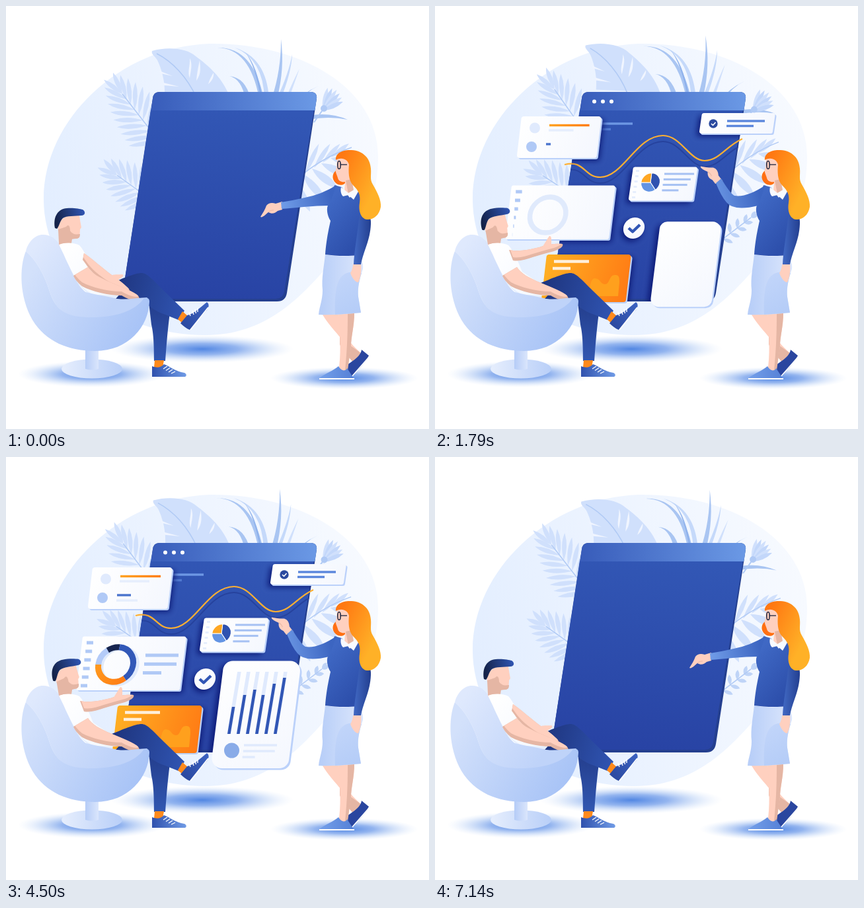
Animation, 640 px wide and 640 px high, one loop 7210 ms. Source, as an HTML page with a canvas:

```html
<!DOCTYPE html>
<html lang="en">
<head>
<meta charset="utf-8">
<title>Dashboard presentation</title>
<style>
html, body { margin: 0; width: 100%; height: 100%; overflow: hidden; background: #fff; }
canvas { display: block; width: 100vw; height: 100vh; }
</style>
</head>
<body>
<canvas id="stage" width="640" height="640"></canvas>
<script>
const ctx = document.getElementById('stage').getContext('2d');
const LOOP = 7210, TAU = Math.PI * 2;
const SKIN = '#ffd0bf', SKIN_DARK = '#e5b6a4', LEAF = '#d0e0fc', VEIN = '#b0caf5';
const PALE = '#e6eefd', SOFT = '#b0c9f6', BLUE = '#3156b5';

// --- timing ---
const ease = u => u < .5 ? 2 * u * u : 1 - 2 * (1 - u) * (1 - u);
const ramp = (t, a, b) => ease(Math.min(1, Math.max(0, (t - a) / (b - a))));
const span = (t, a, b, c, d) => ramp(t, a, b) * (1 - ramp(t, c, d));

// --- drawing helpers ---
const cache = new Map();
function path(d) {
  if (typeof d !== 'string') return d;
  if (!cache.has(d)) cache.set(d, new Path2D(d));
  return cache.get(d);
}
function lin(x0, y0, x1, y1, ...colors) {
  const g = ctx.createLinearGradient(x0, y0, x1, y1);
  colors.forEach((c, i) => g.addColorStop(i / (colors.length - 1), c));
  return g;
}
function fill(d, color) { ctx.fillStyle = color; ctx.fill(path(d)); }
function line(d, color, width, cap = 'butt') {
  ctx.strokeStyle = color;
  ctx.lineWidth = width;
  ctx.lineCap = cap;
  ctx.lineJoin = 'round';
  ctx.stroke(path(d));
}
function disc(x, y, r, color, ry = r) {
  if (r <= 0) return;
  ctx.fillStyle = color;
  ctx.beginPath();
  ctx.ellipse(x, y, r, ry, 0, 0, TAU);
  ctx.fill();
}
function bar(x, y, w, color, p = 1, h = 3.4) {
  ctx.fillStyle = color;
  ctx.fillRect(x, y - h / 2, w * p, h);
}
function group(draw) { ctx.save(); draw(); ctx.restore(); }
function turn(x, y, a, draw) {
  group(() => { ctx.translate(x, y); ctx.rotate(a); ctx.translate(-x, -y); draw(); });
}
// lean to the right around height y, like the cards
function lean(y, draw) {
  group(() => { ctx.transform(1, 0, -.13, 1, .13 * y, 0); draw(); });
}
function morph(a, b, p) {
  const to = b.match(/-?[\d.]+/g);
  let i = 0;
  return new Path2D(a.replace(/-?[\d.]+/g, n => +n + (to[i++] - n) * p));
}
// skin with a darker lower side
function limb(shape, dy = -5) {
  group(() => {
    fill(shape, SKIN_DARK);
    ctx.clip(path(shape));
    ctx.translate(0, dy);
    fill(shape, SKIN);
  });
}
function glow(x, y, rx, ry) {
  group(() => {
    ctx.translate(x, y);
    ctx.scale(rx, ry);
    const g = ctx.createRadialGradient(0, 0, 0, 0, 0, 1);
    g.addColorStop(0, 'rgba(78,132,226,.98)');
    g.addColorStop(.4, 'rgba(106,152,233,.72)');
    g.addColorStop(.75, 'rgba(150,185,241,.28)');
    g.addColorStop(1, 'rgba(200,220,250,0)');
    disc(0, 0, 1, g);
  });
}

// --- plants ---
function lens(x, y, a, len, w, color) {
  group(() => {
    ctx.translate(x, y);
    ctx.rotate(a);
    ctx.beginPath();
    ctx.moveTo(0, 0);
    ctx.quadraticCurveTo(len * .6, -w, len, 0);
    ctx.quadraticCurveTo(len * .5, w, 0, 0);
    ctx.fillStyle = color;
    ctx.fill();
  });
}
function frond(x0, y0, x1, y1, n, len, w, color = LEAF) {
  const axis = Math.atan2(y1 - y0, x1 - x0);
  for (let i = 0; i <= n; i++) {
    const s = i / n, x = x0 + (x1 - x0) * s, y = y0 + (y1 - y0) * s;
    for (const side of [-1, 1])
      lens(x, y, axis + side * (1.05 - .8 * s * s), len * (1 - .25 * s * s), w, color);
  }
  line(`M${x0} ${y0}L${x1} ${y1}`, VEIN, 1.5);
}
function blade(x0, y0, cx, cy, x1, y1, w, color) {
  fill(`M${x0} ${y0}Q${cx} ${cy} ${x1} ${y1}h${-w}Q${cx - w * .7} ${cy + w * .3} ${x0} ${y0}Z`, color);
}
function plants(t) {
  const sway = (1 - Math.cos(TAU * 5 * t / LOOP)) / 2;
  turn(325, 228, .1 * sway, () => frond(232, 205, 176, 133, 9, 47, 7));
  turn(180, 360, -.1 * sway, () => frond(218, 292, 168, 256, 7, 42, 7));
  turn(401, 208, .1 * sway, () => {
    fill('M221 68C245 61 274 64 287 76C302 87 326 106 337 134H240C241 112 234 92 229 82C226 76 219 73 221 68Z', LEAF);
    fill('M278 79C283 88 279 100 278 109C274 100 279 90 278 79ZM293 82C294 92 296 102 288 113C289 101 291 92 293 82ZM314 101C315 108 311 114 306 118C308 111 311 106 314 101ZM232 98L252 106L234 102ZM238 116L262 122L239 120Z', '#f0f5ff');
    line('M228 72C252 84 274 108 288 138', VEIN, 1.5);
  });
  turn(252, 242, -.073 * sway, () => {
    blade(320, 63, 374, 62, 390, 140, 7, '#a9c5f2');
    blade(346, 63, 394, 78, 398, 140, 7, '#c5d9fa');
    blade(362, 70, 380, 90, 388, 140, 3, '#8fb2ec');
    blade(338, 106, 362, 108, 370, 140, 8, '#a9c5f2');
    blade(416, 50, 422, 95, 410, 140, 8, '#a9c5f2');
    blade(433, 73, 432, 100, 416, 140, 6, '#c5d9fa');
    blade(444, 95, 438, 112, 428, 140, 5, '#d0e0fc');
    blade(473, 121, 452, 130, 440, 150, 6, '#a9c5f2');
    fill('M458 166Q490 160 517 172Q488 166 458 172Z', '#a9c5f2');
  });
  turn(468, 172, .24 * sway, () => {
    for (let i = 0; i < 6; i++) lens(479, 158, -1.35 + i * .19, 38 - Math.abs(i - 2) * 1.5, 7, i % 2 ? '#c3d7fa' : LEAF);
    line('M466 176L480 156', VEIN, 2);
    disc(481, 155, 5, VEIN);
  });
  turn(350, 275, -.1 * sway, () => {
    for (let i = 0; i < 5; i++) lens(440 + i * 13, 261 - i * 8, -1.3 + i * .16, 54 - i * 5, 7, LEAF);
    for (let i = 0; i < 5; i++) lens(435 + i * 14, 262 - i * 8, 1.1 - i * .22, 55 - i * 3, 12, LEAF);
    line('M440 262C465 240 490 225 523 214', VEIN, 1.5);
  });
  const grow = ramp(t, 900, 1400);
  if (grow > 0) group(() => {
    ctx.translate(440, 350 - 2 * sway);
    ctx.scale(grow, grow);
    frond(-4, 3, 38, -29, 4, 16, 6, '#bfd4f7');
  });
}

// --- screen and cards ---
const SCREEN = 'M232 130H461Q471 130 470 140L425 434Q423 447 410 447H188Q175 447 176 438L222 140Q223 130 232 130Z';

function board(t) {
  fill(SCREEN, '#243f8f');
  fill('M219 157H466L421 432Q419 443 408 443H176V438Z', lin(330, 150, 290, 440, '#3257b5', '#2843a4'));
  fill('M219.3 158L222 140Q223 130 232 130H461Q471 130 470 140L467.3 158Z', lin(220, 0, 470, 0, '#385cba', '#6b99e5'));
  const p = span(t, 200, 550, 6800, 7080);
  for (let i = 0; i < 3; i++) disc(241 + 13 * i, 144.5, 3 * p, '#fff');
  bar(228, 178, 71, '#6d97e4', p);
  bar(227, 186.5, 39, '#5079d0', p);
}

function slab(l, r, top, bottom, slant, rad) {
  const s = new Path2D();
  s.moveTo((l + r) / 2, top);
  s.arcTo(r, top, r - slant, bottom, rad);
  s.arcTo(r - slant, bottom, l - slant, bottom, rad);
  s.arcTo(l - slant, bottom, l, top, rad);
  s.arcTo(l, top, r, top, rad);
  s.closePath();
  return s;
}
function arc(x, y, r, a = 0, b = 360) {
  const s = new Path2D();
  s.arc(x, y, r, a * TAU / 360, b * TAU / 360);
  return s;
}
function leaningDisc(x, y, r) {
  const s = new Path2D();
  s.ellipse(x, y, r * 1.06, r * .95, -TAU / 8, 0, TAU);
  return s;
}
// shade: horizontal direction of the shadow, rim: thickness of the lower right edge
function card(k, draw) {
  const { shape, cx, cy, scale = 1, alpha = 1, dx = 0, paint, rim = 2, shade = 4 } = k;
  if (alpha <= .01 || scale <= .01) return;
  const place = shift => {
    ctx.globalAlpha = alpha;
    ctx.translate(cx + dx + shift, cy);
    ctx.scale(scale, scale);
    ctx.translate(-cx, -cy);
  };
  group(() => {
    ctx.clip(path(SCREEN));
    place(-2000);
    ctx.shadowColor = 'rgba(10,22,115,.95)';
    ctx.shadowBlur = 9;
    ctx.shadowOffsetX = 2000 + shade;
    ctx.shadowOffsetY = 4;
    fill(shape, '#000');
  });
  group(() => {
    place(0);
    if (rim) group(() => { ctx.translate(rim, rim); fill(shape, '#bbd1fa'); });
    fill(shape, paint);
    draw();
  });
}
const slabs = {
  list: slab(131, 252, 167, 230, 7.5, 4),
  note: slab(404, 515, 162, 193, 4.5, 3),
  pie: slab(300, 397.5, 243.5, 294.5, 7.5, 3),
  ring: slab(116, 273, 271.5, 353, 10, 3),
  sun: slab(169, 297, 376, 448, 8.5, 4),
  chart: slab(330, 447, 308.5, 471, 20.5, 15),
  tick: leaningDisc(301, 336, 16)
};
const paper = (x0, y0, x1, y1) => lin(x0, y0, x1, y1, '#ffffff', '#f4f7fe');

function wedge(x, y, r, a, b, color) {
  const s = new Path2D();
  s.moveTo(x, y);
  s.arc(x, y, r, a * TAU / 360, b * TAU / 360);
  s.closePath();
  fill(s, color);
  line(s, '#fff', 1);
}

function wave(t) {
  const curve = 'M196 240C226 232 225 259 250 259C285 259 305 196 345 196C372 196 385 234 408 234C430 234 440 212 465 201';
  group(() => {
    ctx.clip(path(SCREEN));
    ctx.globalAlpha = span(t, 300, 650, 6800, 7080);
    ctx.translate(0, 9);
    line(curve, '#26429d', 2);
  });
  const p = span(t, 400, 1400, 6256, 6956);
  if (p > 0) group(() => {
    ctx.beginPath();
    ctx.rect(195, 180, 271 * p, 100);
    ctx.clip();
    line(curve, '#ffb032', 2.2);
  });
}

function listCard(t) {
  const p = span(t, 450, 1000, 6170, 6640);
  card({ shape: slabs.list, cx: 190, cy: 199, alpha: p, dx: 23 * (1 - p), paint: paper(131, 167, 250, 230) }, () => {
    disc(151, 184.5, 8 * span(t, 1150, 1500, 5950, 6300), '#e0eafd');
    disc(146, 213, 8 * span(t, 1250, 1600, 6050, 6380), SOFT);
    bar(173, 180.5, 61, lin(173, 0, 234, 0, '#ffa322', '#ff7c13'), span(t, 1300, 1820, 5800, 6300));
    bar(172, 188, 45, PALE, span(t, 1400, 1950, 5850, 6350));
    bar(168, 209, 21, '#4a74cd', span(t, 1570, 2110, 5950, 6500));
    bar(167, 217, 32, PALE, span(t, 1780, 2350, 6200, 6700));
  });
}
function noteCard(t) {
  const p = span(t, 430, 990, 6550, 6950);
  card({ shape: slabs.note, cx: 458, cy: 178, alpha: p, dx: -40 * (1 - p), shade: -4, paint: paper(404, 162, 512, 193) }, () => {
    const q = span(t, 950, 1350, 6330, 6800);
    disc(421, 178, 6.7 * q, '#2b4a9f');
    if (q > .8) line('M418 178L420.5 180.5L424.5 176', '#fff', 1.6);
    bar(442, 174, 57, '#5b86dc', q);
    bar(441, 181.5, 41, '#5b86dc', q);
  });
}
function pieCard(t) {
  card({ shape: slabs.pie, cx: 345, cy: 269, scale: span(t, 850, 1350, 6560, 6960), shade: -4, paint: paper(300, 243, 395, 295) }, () => {
    for (let i = 0; i < 6; i++) bar(304 - i * 1.2, 249.5 + i * 8, 5, PALE, 1, 3);
    lean(267, () => {
      wedge(326, 267, 14.3, -90, 52, '#2f52b0');
      wedge(326, 267, 14.3, 52, 180, '#6394e4');
      wedge(326, 267, 14.3, 180, 270, '#ffa723');
    });
    [45, 41, 37, 25].forEach((w, i) =>
      bar(347 - i * 1.2, 254 + i * 8.3, w, '#a6c1f3', span(t, 1150, 1650, 6280 + i * 110, 6880 + i * 110), 3));
  });
}
function ringCard(t) {
  const p = span(t, 850, 1400, 6650, 7000);
  card({ shape: slabs.ring, cx: 190, cy: 312, alpha: p, dx: 25 * (1 - p), paint: paper(116, 271, 268, 353) }, () => {
    for (let i = 0; i < 6; i++) {
      const q = span(t, 1250 + i * 90, 1900 + i * 110, 6050 + i * 70, 6520 + i * 100);
      bar(122 - i * 1.8 + 4 * (1 - q), 281 + i * 13, 10, SOFT, q, 5);
    }
    const q = span(t, 1850, 2600, 6500, 7000), sweep = 360 * q;
    const arcs = [[-125, -85, '#17254f'], [-85, 52, '#3258b8'], [52, 180, lin(196, 340, 136, 315, '#ff7411', '#ff9a1f')], [180, 235, '#b4cbf8']];
    lean(314, () => {
      line(arc(171, 316, 27), '#e0eafc', 7.5);
      for (const [a, b, color] of arcs) {
        const end = Math.min(b, -125 + sweep);
        if (end > a) line(arc(166, 314, 26.3, a, end), color, 9);
      }
    });
    [50, 49, 28].forEach((w, i) =>
      bar(211 - i * 2, 300 + i * 13.3, w, SOFT, span(t, 2512 + i * 114, 3112 + i * 114, 6170 + i * 110, 6770 + i * 110), 5));
  });
}
function sunCard(t) {
  card({ shape: slabs.sun, cx: 231, cy: 413, scale: span(t, 1000, 1500, 6380, 6930), paint: lin(165, 390, 292, 435, '#ffb023', '#ff7a14') }, () => {
    const p = span(t, 1300, 1700, 6100, 7100);
    bar(180 + 9 * (1 - p), 386.5, 53 - 12 * (1 - p), '#fff0dc', 1, 4.5 * p);
    bar(178, 397, 27, '#fff0dc', p, 4.5);
    fill('M230 439C236 420 236 412 242 412C250 412 250 421 257 421C265 421 263 407 272 407C279 406 279 412 279 418L277 439Z', '#ffa01d');
  });
}
function tickBadge(t) {
  card({ shape: slabs.tick, cx: 301, cy: 336, scale: span(t, 1150, 1500, 6600, 6950), rim: 0, shade: -3, paint: paper(290, 322, 314, 350) }, () =>
    line('M293 336L299 341.5L310 331', BLUE, 4.4));
}
function column(x, h, p, w, color) {
  const dx = h * .167, y = 419 - h * p;
  if (p > .01) fill(`M${x} 419L${x + dx} ${y}h${w}L${x + w} 419Z`, color);
}
function chartCard(t) {
  card({ shape: slabs.chart, cx: 384, cy: 395, scale: span(t, 1400, 1976, 6360, 6960), shade: -5, paint: paper(330, 308, 440, 471), rim: 2.5 }, () => {
    [41, 59, 67, 59, 76, 85].forEach((h, i) => {
      const x = 335 + 14 * i, out = 5270 + 215 * i;
      column(x - .5, 94, span(t, 1800 + 70 * i, 2350 + 70 * i, out, out + 770), 5.5, '#e0eafd');
      column(x, h, span(t, 1894 + 100 * i, 2664 + 100 * i, out, out + 770), 4.6, BLUE);
    });
    disc(341.5, 444, 11.5 * span(t, 1850, 2250, 6450, 6950), '#89abe8');
    [50, 48, 19].forEach((w, i) =>
      bar(360 - i * 1.2, 436 + i * 9, w, '#e0eafd', span(t, 2000 + i * 130, 2500 + i * 130, 6170 + i * 110, 6770 + i * 110)));
  });
}

// --- man in the chair ---
const ARM = [
  'M118 374C130 382 145 396 160 407C168 412 178 420 184 426C190 432 188 436 180 434C168 430 154 422 140 411C128 402 122 392 116 384Z',
  'M116 373C130 384 145 388 162 394C172 398 186 398 193 403C196 408 188 412 180 412C168 412 160 407 150 404C138 399 126 396 118 386Z',
  'M112 369C128 372 140 369 158 365C168 361 183 359 193 360C195 364 188 368 180 371C168 374 158 377 148 380C138 383 128 387 118 385Z'
];
const THUMB = [
  'M156 409C164 405 168 407 176 406C180 408 176 411 166 416Z',
  'M163 398C170 394 176 390 182 387C186 388 184 393 178 401Z',
  'M161 367C165 360 169 354 173 348C177 348 176 354 176 363Z'
];
const pose = (keys, p) => p < .4 ? morph(keys[0], keys[1], p / .4) : morph(keys[1], keys[2], (p - .4) / .6);

function man(t) {
  const p = span(t, 350, 1150, 5850, 6750);
  const inner = lin(30, 380, 150, 470, '#dfe9fd', '#bfd3f9');
  // chair stand and back
  disc(130, 549, 46, lin(84, 0, 176, 0, '#e6eefd', '#b9cff8'), 14.5);
  fill('M120 515H140V549Q130 552 120 549Z', lin(120, 0, 140, 0, '#b5ccf7', '#dbe6fc'));
  fill('M30 371C34 355 46 345 57 346C75 347 83 361 92 384C104 414 114 438 140 440C165 444 190 443 214 441C200 460 165 472 130 472C92 472 76 462 66 432C58 406 46 385 30 371Z', inner);
  // head and torso
  fill('M80 340V362C86 366 96 364 99 359L101 346Z', SKIN_DARK);
  fill('M80 361C90 357 104 358 111 362C119 370 127 390 132 402L168 426V438L135 437C118 432 108 418 102 406C93 390 86 372 80 361Z', lin(85, 370, 160, 435, '#ffffff', '#f4f8ff'));
  turn(95, 360, -.12 * p, () => {
    fill('M78 334C80 325 88 318 97 317H111C112 324 113 330 114 335L112 338C112 345 111 350 108 352L92 351C84 348 79 344 78 334Z', SKIN);
    fill('M79 338L91 334C95 329 97 334 97 340C101 346 106 346 112 345C112 350 110 352 106 352C100 353 96 352 93 357L80 359Z', SKIN_DARK);
    fill('M74 336C71 318 79 307 92 306C102 305 112 307 116 308C121 311 120 317 114 317C104 318 92 317 86 321C81 326 80 335 77 337Z', lin(74, 320, 119, 310, '#142248', '#2f55b3'));
  });
  // legs
  fill('M215 440L249 456C245 485 243 510 241 537H224C224 510 223 495 220 482Z', lin(0, 450, 0, 537, '#243e8d', '#3157b1'));
  fill('M160 419C175 413 195 404 205 404C213 404 220 412 239 431L270 461L261 475L241 467C228 463 215 454 212 449L166 443L174 434Z', lin(165, 430, 268, 455, '#1f3680', '#2f53b0'));
  fill('M267 462L275 469L267 480L260 474Z', '#ff8a1c');
  fill('M274 468C284 466 294 456 304 448C308 451 307 456 304 460L278 490C273 488 268 484 264 480Z', lin(264, 480, 305, 450, '#2b489f', '#3b62c0'));
  line('M306 456L279 490', '#fff', 2);
  line('M277 463l2 6M282 461l2 6M286 459l1.500 6M290 457l0 6', '#fff', 1.4);
  fill('M225 536H239L237 547H224Z', '#ff8a1c');
  fill('M221 545C229 548 234 547 239 542C248 545 256 553 270 555C274 557 273 560 271 561H221Z', lin(221, 0, 272, 0, '#2f51ad', '#6f9ae5'));
  line('M221 562H272', '#fff', 2);
  line('M238 549l6 -4M242 551.500l6 -4M246 554l6 -4M250 556l6 -3', '#fff', 1.3);
  // arms
  limb(pose(ARM, p));
  fill(pose(THUMB, p), SKIN);
  limb('M102 408L124 395C130 405 142 411 158 418C172 424 188 430 197 436C203 440 203 444 198 446C190 446 182 442 175 438C155 438 130 432 115 424C108 418 104 413 102 408Z', -6);
  // chair front
  fill('M110 430C128 436 150 438 168 443C185 445 200 441 214 441C200 460 165 472 130 472C112 472 100 465 98 450Z', inner);
  fill('M30 371C20 395 20 440 40 475C60 508 95 522 135 522C185 522 216 485 217 447C217 442 214 441 209 442C195 462 165 471 130 471C92 471 76 462 66 432C58 406 46 385 30 371Z', lin(40, 400, 205, 500, '#d3e1fb', '#a6c2f6'));
}

// --- woman ---
const SLEEVE = [
  'M500 271Q478 285 452 290Q435 294 416 297L417 307Q430 306 450 304Q472 302 489 302Z',
  'M500 271Q472 290 453 287Q446 283 433 261L425 268Q433 288 441 297Q452 311 489 302Z'
];
function woman(t) {
  const p = span(t, 760, 1500, 6080, 6870);
  // legs and shoes
  fill('M479 467C488 482 498 492 507 503L526 540L538 526C528 517 521 510 515 500L503 467Z', SKIN);
  fill('M505 500C512 510 526 516 538 526L526 540C516 528 508 520 505 512Z', SKIN_DARK);
  fill('M549 529L538 520C536 532 523 537 514 545C510 552 511 558 514 562H521C532 551 543 541 549 529Z', '#2a469f');
  line('M522 562L550 530', '#fff', 1.5);
  fill('M503 466L527 464C527 485 522 500 522 515L516 551L503 553C507 530 506 500 503 466Z', SKIN);
  fill('M517 465L527 464C527 485 522 500 522 515L517 551L513 552C516 520 517 500 517 465Z', SKIN_DARK);
  fill('M474 563C483 556 495 552 503 545C508 553 514 553 516 548L526 563Z', lin(474, 0, 526, 0, '#74a0ea', '#5580d6'));
  line('M474 564H527', '#fff', 2);
  // skirt
  fill('M483 376C498 379 515 379 532 377C538 382 541 390 540 398C535 412 532 425 533 440L537 464C515 466 495 468 473 467C474 455 479 445 479 430C477 412 481 395 483 376Z', lin(478, 0, 538, 0, '#b9cff8', '#dbe6fc'));
  fill('M498 467C497 440 499 420 507 410C514 402 524 401 538 404C533 420 532 430 533 440L537 464Z', lin(500, 400, 535, 465, '#c3d6fa', '#b4ccf7'));
  // sweater, lowered arm
  fill('M526 389H537C538 400 537 410 533 418C528 418 523 410 521 404C524 400 524 395 526 389Z', SKIN);
  fill('M497 271L508 274L520 290L532 277C545 290 550 310 550 322L534 377C515 379 497 378 483 376C485 350 490 330 491 325C486 318 484 305 488 300Z', lin(484, 300, 540, 350, '#3f68c4', '#2d4fab'));
  fill('M538 305C548 310 553 320 552 330C551 355 541 370 537 391H526C527 370 531 350 534 322Z', lin(528, 0, 552, 0, '#3f66c0', '#233f90'));
  // head
  fill('M499 249C492 255 493 265 502 270C508 272 513 270 515 265L503 260Z', '#ff7013');
  fill('M501 232C508 227 518 230 520 240L523 262L526 278L518 287L512 280L513 266C508 267 503 265 502 260C500 253 497 250 500 245Z', SKIN);
  fill('M514 264L523 262L526 280L518 284Z', SKIN_DARK);
  fill('M507 274L518 283L530 276L534 279L526 293L518 286L510 288C506 284 506 278 507 274Z', '#f7faff');
  fill('M499 233C498 222 510 217 523 218C540 219 551 230 552 246C553 256 550 262 555 270C562 282 568 294 567 304C565 317 555 324 546 323C537 322 533 310 535 298C537 285 533 279 525 271C518 264 518 250 519 240C517 232 508 228 499 233Z', lin(502, 240, 562, 270, '#ff7812', '#ffb127'));
  ctx.strokeStyle = '#1a2440';
  ctx.lineWidth = 1.5;
  ctx.beginPath();
  ctx.ellipse(504, 240.5, 2.2, 6, 0, 0, TAU);
  ctx.stroke();
  line('M506 240H516', '#1a2440', 1.3);
  // pointing arm
  const wx = 416 + 13 * p, wy = 302 - 37 * p;
  turn(wx, wy, 1.195 * p, () => {
    ctx.translate(wx - 416, wy - 302);
    fill('M418 296L408 299C402 297 397 298 394 302C392 308 388 314 385 319C388 321 393 315 397 312C402 315 407 314 411 310L418 308Z', SKIN);
    line('M397 312C400 309 403 309 405 309', SKIN_DARK, 1);
  });
  fill(morph(SLEEVE[0], SLEEVE[1], p), lin(418, 300, 492, 285, '#6f9be7', '#3c65c1'));
}

function scene(t) {
  ctx.fillStyle = '#fff';
  ctx.fillRect(0, 0, 640, 640);
  fill('M57 292C57 172 172 62 308 57C440 55 563 120 563 228C563 305 528 345 488 392C445 442 392 498 302 498C168 498 57 410 57 292Z', lin(70, 330, 560, 180, '#e3eeff', '#f7faff'));
  glow(297, 519, 138, 21);
  glow(130, 557, 112, 20);
  glow(512, 563, 112, 17);
  plants(t);
  board(t);
  wave(t);
  listCard(t);
  noteCard(t);
  pieCard(t);
  ringCard(t);
  sunCard(t);
  chartCard(t);
  tickBadge(t);
  man(t);
  woman(t);
}

const start = performance.now();
function tick() {
  scene((performance.now() - start) % LOOP);
  requestAnimationFrame(tick);
}
tick();
</script>
</body>
</html>
```
